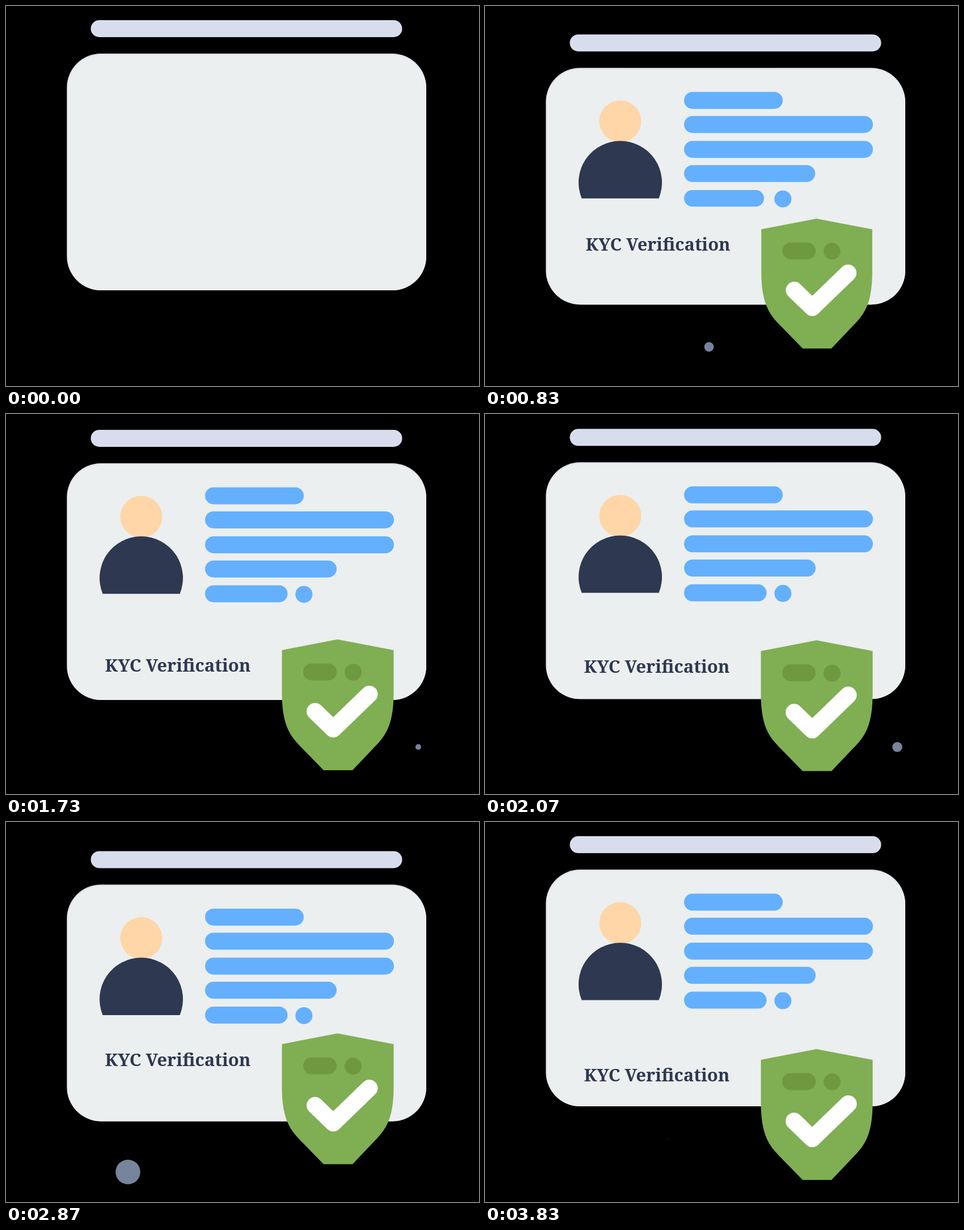
These frames come from a looping animation (834x671 px, 3860 ms). An HTML page:

```html
<!DOCTYPE html>
<html lang="en">
<head>
<meta charset="utf-8">
<title>Verification card</title>
<style>
  html, body { margin: 0; width: 100%; height: 100%; overflow: hidden; background: #000; }
  svg { display: block; width: 100vw; height: 100vh; }
  text { font: bold 31px "Noto Serif", "DejaVu Serif", serif; fill: #2f3851; text-anchor: middle; }
</style>
</head>
<body>
<svg viewBox="0 0 834 671">
  <g id="card">
    <rect x="149.5" y="25" width="549" height="30" rx="15" fill="#d7dded"/>
    <rect x="107.3" y="84" width="633.7" height="418" rx="60" fill="#dfdbea"/>
    <rect x="108.3" y="86" width="632.7" height="416" rx="59.5" fill="#ebefef"/>
    <g id="person">
      <circle cx="238.5" cy="178.5" r="37" fill="#ffd6a7"/>
      <path d="M170.5 314.5A73.5 73.5 0 1 1 306.5 314.5Z" fill="#2f3851"/>
    </g>
    <g id="lines" fill="#64b0ff"></g>
  </g>
  <g id="dots" fill="#76849c"></g>
  <g id="badge">
    <text x="303" y="458.5">KYC Verification</text>
    <path d="M584.5 401L683.5 420V495C683.5 555 668 573 647 594L611 632H560L523 594C502 573 486.5 555 486.5 495V420Z" fill="#80ae53"/>
    <g fill="#6f9940">
      <rect x="524" y="443.5" width="59" height="30" rx="15"/>
      <circle cx="612" cy="459" r="15"/>
    </g>
    <path d="M545 528.3L577 559.3L640.5 497.8" fill="none" stroke="#fff" stroke-width="30" stroke-linecap="round" stroke-linejoin="round"/>
  </g>
</svg>
<script>
const LOOP = 3860, FRAMES = 116, SWING = 29, GROW = 14, PULSE = 9.5;

const $ = id => document.getElementById(id);
const clamp = v => Math.min(1, Math.max(0, v));
const ease = v => { const u = clamp(v); return u * u * (3 - 2 * u); };

function add(parent, tag, attrs) {
  const node = document.createElementNS("http://www.w3.org/2000/svg", tag);
  for (const key in attrs) node.setAttribute(key, attrs[key]);
  return parent.appendChild(node);
}

function scaleAt(node, x, y, s) {
  node.setAttribute("transform", `translate(${x} ${y}) scale(${s}) translate(${-x} ${-y})`);
}

// Text lines: top, width, growth anchor
const lines = [
  [126.5, 174, 350], [169, 333, 352.8], [213, 333, 354.8], [255.7, 232, 351.7], [299.5, 145.5, 352.2]
].map(([y, width, x], i) => ({
  x, y: y + 15, start: 8.5 + i,
  node: add($("lines"), "rect", { x: 351, y, width, height: 30, rx: 15 })
}));
lines.push({
  x: 525.3, y: 315.5, start: 7.4,
  node: add($("lines"), "circle", { cx: 525.3, cy: 315.5, r: 15 })
});

// Pulsing dots: centre, largest radius, start
const dots = [
  [107, 559.5, 15.3, 0.2], [395, 602, 28.7, 21.6], [727, 588, 15, 48.3],
  [215, 618, 28, 73.6], [323.5, 559.5, 17, 97]
].map(([cx, cy, radius, start]) => ({
  radius, start, node: add($("dots"), "circle", { cx, cy, r: 0 })
}));

function draw(frame) {
  const phase = frame % (2 * SWING);
  const swing = ease(1 - Math.abs(phase / SWING - 1));
  $("card").setAttribute("transform", `translate(0 ${26.5 * swing})`);

  const pop = 1.05 * ease((frame - 2) / 11) - 0.05 * ease((frame - 13) / 5);
  scaleAt($("person"), 238.5, 314.5, pop);

  for (const { node, x, y, start } of lines) scaleAt(node, x, y, ease((frame - start) / GROW));
  for (const { node, radius, start } of dots) {
    node.setAttribute("r", radius * ease(1 - Math.abs((frame - start) / PULSE - 1)));
  }

  const s = ease((frame - 11.7) / GROW), x = 584.5, y = 516.5;
  $("badge").setAttribute("transform",
    `translate(${x} ${y - 27.9 * swing}) scale(${s}) translate(${-x} ${-y})`);
}

const origin = performance.now();
function tick() {
  const t = (performance.now() - origin) % LOOP;
  draw(Math.floor(t * FRAMES / LOOP + 0.15) % FRAMES);
  requestAnimationFrame(tick);
}
tick();
</script>
</body>
</html>
```
